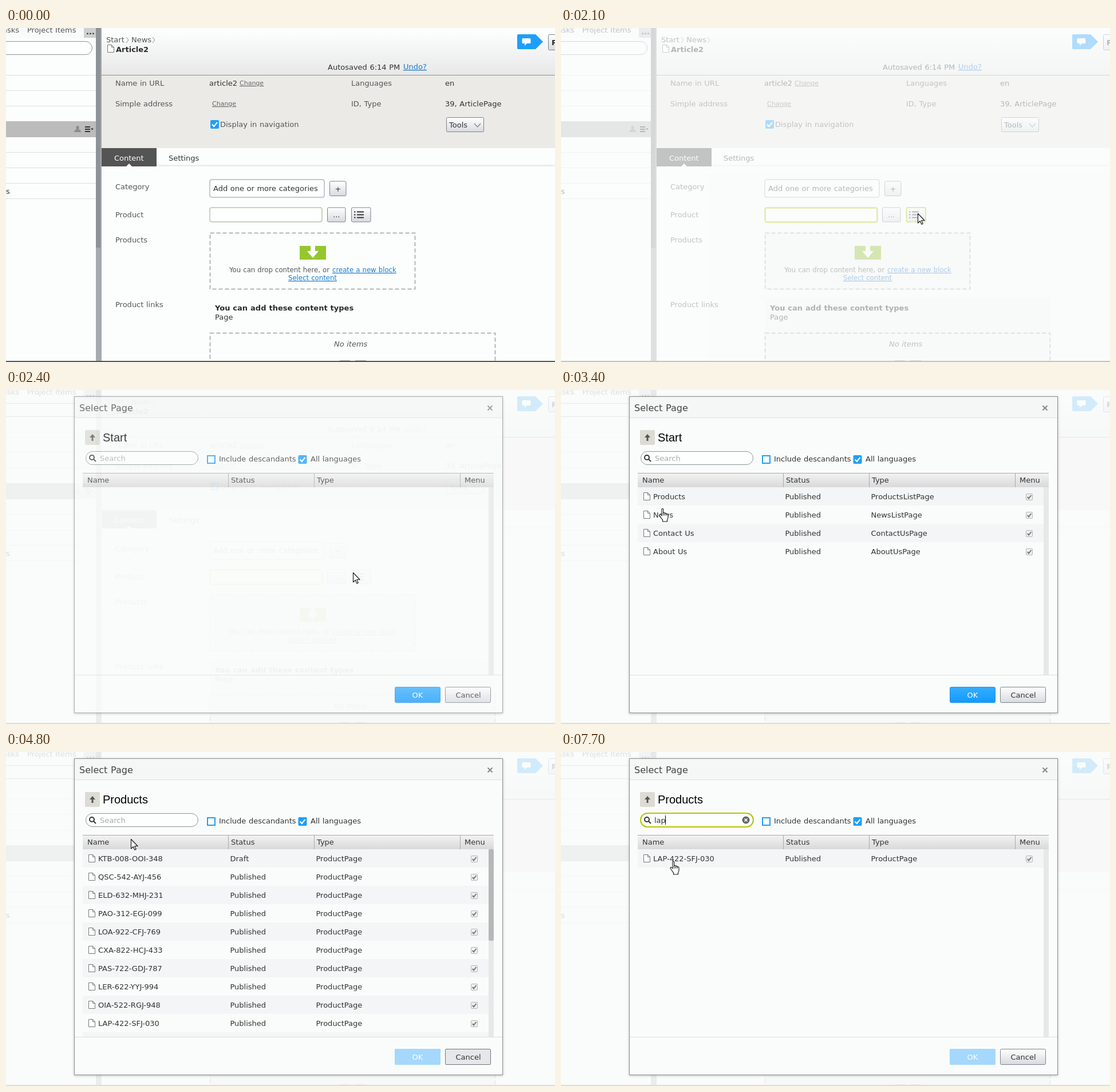
Recreate the animation shown at these times as an HTML page. Size 959 px wide and 584 px high, loop 8000 ms.

```html
<!DOCTYPE html>
<html lang="en">
<head>
<meta charset="utf-8">
<title>Select Page</title>
<style>
html, body { margin: 0; width: 100%; height: 100%; overflow: hidden; background: #fcfefe; }
svg { display: block; width: 100%; height: 100%; }
text { font: 13px "DejaVu Sans", sans-serif; word-spacing: .034em; fill: #555; white-space: pre; }
.dark text, text.dark { fill: #333; }
text.bold { font-weight: bold; fill: #2b2b2b; }
text.small { font-size: 11px; text-decoration: underline; fill: #666; }
text.drop { font-size: 11.7px; }
text.link { fill: #1a7bd0; text-decoration: underline; }
text.title { font-size: 16px; fill: #444; }
text.heading { font: 20px "Liberation Sans", Arial, sans-serif; fill: #000; }
.button { fill: url(#metal); stroke: #7d8389; }
.box { fill: #fdfefe; stroke: #8f9499; }
.dash { fill: none; stroke: #b4b4b8; stroke-width: 2; stroke-dasharray: 7 4; }
.line { fill: none; stroke: #dedede; }
.focus { fill: none; stroke: #b3c800; stroke-width: 2; }
.ink { fill: none; stroke: #333; stroke-width: 2; }
.pointer { fill: #fff; stroke: #111; stroke-width: 1.1; stroke-linejoin: round; }
</style>
</head>
<body>
<svg viewBox="0 0 959 584">
<defs>
  <linearGradient id="metal" x2="0" y2="1"><stop stop-color="#fff"/><stop offset="1" stop-color="#d8dae0"/></linearGradient>
  <linearGradient id="header" x2="0" y2="1"><stop offset=".1" stop-color="#fcfdfd"/><stop offset="1" stop-color="#e8e8e8"/></linearGradient>
  <linearGradient id="columns" x2="0" y2="1"><stop stop-color="#f3f3f3"/><stop offset="1" stop-color="#d9d9da"/></linearGradient>
  <linearGradient id="primary" x2="0" y2="1"><stop stop-color="#36adff"/><stop offset="1" stop-color="#129aff"/></linearGradient>
  <clipPath id="listArea"><path d="M134 170H843V498H134Z"/></clipPath>
  <filter id="shadow" x="-5%" y="-5%" width="110%" height="110%"><feDropShadow dx="0" dy="1" stdDeviation="2" flood-opacity=".25"/></filter>
  <path id="file" d="M.5 .5H7.5L11.5 4.5V13.5H.5ZM7.5 .5V4.5H11.5" fill="#fff" stroke="#777"/>
  <g id="checked"><rect width="15" height="15" rx="2" fill="#1c9ffb"/><path d="M3 7.5L6.3 11L12 4" fill="none" stroke="#fff" stroke-width="2.2"/></g>
  <g id="tick"><rect x=".5" y=".5" width="11" height="11" rx="1.5" fill="#f0f0f0" stroke="#b5b5b5"/><path d="M2.8 6L5 8.6L9.4 3" fill="none" stroke="#777" stroke-width="2"/></g>
</defs>

<rect width="959" height="584" fill="#fcfefe"/>

<!-- Side panel -->
<rect width="157" height="18" fill="#f9fafa"/>
<text x="-6" y="8">asks</text><text x="37" y="8">Project Items</text>
<rect x="136" width="21" height="17" fill="#cdcfd1"/><text class="bold" x="140" y="11">...</text>
<path class="box" d="M-5 23.5H139a11.5 11.5 0 0 1 0 23H-5"/>
<path class="line" d="M0 82.5H157M0 109.5H157M0 136.5H157M0 217.5H157M0 244.5H157M0 271.5H157M0 298.5H157"/>
<rect y="163" width="157" height="28" fill="#bcbcbc"/>
<path d="M119 182q0-4 4-4.500q-2-6 2-6.500q4 .5 2 6.500q4 .5 4 4.500Z" fill="#8c8c8c"/>
<path class="ink" d="M138 173H147M138 177H147M138 181H147"/><path d="M148 175.500h5l-2.500 3Z" fill="#333"/>
<text class="dark" x="0" y="290">s</text>
<rect x="157" width="10" height="584" fill="#a5aaae"/>
<rect x="157" width="8" height="384" fill="#8d9296"/>

<!-- Page header -->
<rect x="167" width="792" height="82" fill="url(#header)"/>
<rect x="167" y="82" width="792" height="128" fill="#ebeae6"/>
<path d="M167 82.500H959" stroke="#8f9191"/>
<text x="175" y="25">Start</text><text x="219" y="25">News</text>
<path d="M210 16l4 5l-4 5M256 16l4 5l-4 5" fill="none" stroke="#888"/>
<use href="#file" x="177" y="29"/><text class="bold" x="192" y="42">Article2</text>
<text class="dark" x="562" y="73">Autosaved 6:14 PM</text><text class="link" x="694" y="72">Undo?</text>
<path d="M895 11H925L938 24L925 37H895a2 2 0 0 1-2-2V13a2 2 0 0 1 2-2Z" fill="#1c9ffb"/>
<path d="M903 18h12q1.500 0 1.500 1.500v6q0 1.500-1.500 1.500h-5l-4 4v-4h-3q-1.500 0-1.500-1.500v-6q0-1.500 1.500-1.500Z" fill="#fff"/>
<rect class="button" x="947.500" y="11.500" width="40" height="27" rx="2"/><text class="bold" x="953" y="30">P</text>

<text x="191" y="101">Name in URL</text><text class="dark" x="355" y="101">article2</text><text class="small" x="408" y="100">Change</text>
<text x="603" y="101">Languages</text><text class="dark" x="767" y="101">en</text>
<text x="191" y="137">Simple address</text><text class="small" x="360" y="136">Change</text>
<text x="603" y="137">ID, Type</text><text class="dark" x="767" y="137">39, ArticlePage</text>
<use href="#checked" x="357" y="161"/><text x="374" y="173">Display in navigation</text>
<rect class="button" x="769.500" y="156.500" width="65" height="25" rx="2"/><text class="dark" x="774" y="174">Tools</text>
<path d="M818 167l5.500 6l5.500-6" fill="none" stroke="#888" stroke-width="1.500"/>

<!-- Form -->
<rect x="263" y="239" width="696" height="3" fill="#ededed"/>
<path d="M167 210H263V242H220L215 237L210 242H167Z" fill="#545454"/>
<text x="189" y="232" style="fill:#fff">Content</text><text class="dark" x="284" y="232">Settings</text>
<text x="191" y="282">Category</text><rect class="box" x="356" y="265" width="200" height="31" rx="3"/><text class="dark" x="362" y="285">Add one or more categories</text>
<rect class="button" x="565.500" y="268" width="28.500" height="25.500" rx="2"/><text class="dark" x="574.500" y="285.500">+</text>
<text x="191" y="331">Product</text><rect class="box" x="356" y="314" width="196" height="25" rx="3" style="stroke:#a0a085"/>
<rect class="focus" data-on="1000" x="356.500" y="314.500" width="196" height="25" rx="3" stroke-opacity=".6"/>
<rect class="focus" data-on="1100" x="356.500" y="314.500" width="196" height="25" rx="3"/>
<rect class="button" x="561.500" y="314" width="31.500" height="25" rx="2"/><text class="dark" x="571" y="331">...</text>
<rect class="button" x="603.500" y="314" width="33.500" height="25" rx="2"/>
<path class="ink" d="M613 321.500H625M613 326.500H625M613 331.500H625M608 321.500h2.500M608 326.500h2.500M608 331.500h2.500"/>
<rect class="focus" data-on="1900" x="603.500" y="314" width="33.500" height="25" rx="2"/>
<text x="191" y="375">Products</text>
<rect class="dash" x="356.500" y="358.500" width="358" height="98"/>
<rect x="513" y="381" width="46" height="24" fill="#95c62f"/><path d="M532 379h8v11h6l-10 12l-10-12h6Z" fill="#fff"/>
<text class="drop" x="390" y="427">You can drop content here, or</text><text class="drop link" x="570" y="427">create a new block</text>
<text class="drop link" x="493" y="441">Select content</text>
<text x="191" y="488">Product links</text><text class="bold" x="365" y="494">You can add these content types</text><text class="dark" x="365" y="510">Page</text>
<rect class="dash" x="356.500" y="533.500" width="498" height="80"/>
<text x="573" y="557" font-style="italic" style="font-style:italic">No items</text>
<path d="M583 581.500h18M610 581.500h19" stroke="#aaa"/>
<rect y="582" width="959" height="2" fill="#55585a"/>

<!-- Veil -->
<g id="veil">
  <rect width="959" height="584" fill="#fafcfc"/>
  <path d="M356 358H715V457H356ZM356 472H855V582H356Z" fill="#f7f7f7"/>
</g>

<!-- Dialog -->
<g id="dialog">
  <rect x="119.500" y="11.500" width="748" height="553" fill="#fafcfb" stroke="#8e8e8e" filter="url(#shadow)"/>
  <rect x="120" y="12" width="747" height="36" fill="#f5f6f6"/><path class="line" d="M120 48.500H867M120 498.500H867"/>
  <text class="title" x="128" y="37">Select Page</text>
  <path class="ink" d="M841.500 27.500l8 8m0-8l-8 8" style="stroke:#888"/>
  <rect x="138" y="70" width="26" height="26" rx="2" fill="#dcdbd4"/><path d="M151 77l5 6h-3.500v6h-3v-6H146Z" fill="#555"/>
  <text class="heading" data-off="4700" x="169" y="90">Start</text><text class="heading" data-on="4700" x="169" y="90">Products</text>

  <rect class="box" x="139.500" y="107.500" width="196" height="23" rx="11.500"/>
  <rect class="focus" data-on="6000" x="139" y="107" width="197" height="24" rx="12"/>
  <circle class="ink" cx="150" cy="118" r="4"/><path class="ink" d="M153 121l4 4"/>
  <text data-off="6500" x="164" y="124" style="fill:#aaa">Search</text>
  <text id="query" class="dark" x="163" y="124"></text>
  <path id="caret" data-on="6000" d="M.5 111V127" stroke="#000"/>
  <g data-on="6600"><circle cx="323" cy="119" r="6.500" fill="#666"/><path d="M320.500 116.500l5 5m0-5l-5 5" stroke="#fff" stroke-width="1.600"/></g>
  <rect x="352" y="115" width="13" height="13" fill="#fff" stroke="#1c9ffb" stroke-width="2"/><use href="#checked" x="510.500" y="114"/>
  <g class="dark"><text x="372" y="125">Include descandants</text><text x="532" y="125">All languages</text></g>

  <rect x="134" y="145" width="718" height="25" fill="url(#columns)"/>
  <path d="M134 145.500H852M388.500 146V170M538.500 146V170M793.500 146V170" stroke="#a9a9a9"/>
  <g class="dark"><text x="142" y="162">Name</text><text x="393" y="162">Status</text><text x="543" y="162">Type</text><text x="801" y="162">Menu</text></g>
  <rect x="843" y="170" width="9" height="328" fill="#e7e8e8"/>
  <rect data-on="4800" data-off="7200" x="843" y="170" width="9" height="160" rx="2" fill="#b6b7b7"/>
  <g id="lists" class="dark" clip-path="url(#listArea)"></g>

  <rect x="679.500" y="519.500" width="79" height="27" rx="2" fill="url(#primary)" stroke="#1a93ea"/>
  <rect data-on="4700" x="679" y="519" width="80" height="28" rx="2" fill="#a4d8fc"/>
  <text x="709.500" y="538" style="fill:#fff">OK</text>
  <rect class="button" x="767.500" y="519.500" width="79" height="27" rx="2"/>
  <rect data-on="4000" data-off="6500" x="767.500" y="519.500" width="79" height="27" rx="2" fill="#e6e7ea" stroke="#6f757b"/>
  <text class="dark" x="785.500" y="538">Cancel</text>
</g>

<!-- Pointers -->
<g id="hand" class="pointer">
  <path d="M5 2Q5 .7 6.300 .7T7.700 2V8.500Q8 7.600 9.200 7.800T10.500 9.300Q11 8.600 12 8.900T13.300 10.400Q14 9.800 15 10.300T16 12V16Q16 18.500 14.500 20.500V23.500H6.500V20.500Q4.500 18.500 3.500 16.500L1 13Q.5 11.700 1.600 11.200T3.700 12L5 13.500Z"/>
  <path d="M7.700 8V13M10.500 9V13M13.300 10V13" fill="none"/>
</g>
<path id="arrow" class="pointer" d="M.5 .5V17L4.300 13.400L6.800 19.200L9.200 18.200L6.700 12.500H12Z"/>
<path id="beam" d="M-3 -7.500H-1L0 -6.500L1 -7.500H3M0 -6.500V6.500M-3 7.500H-1L0 6.500L1 7.500H3" fill="none" stroke="#111" stroke-width="1.200"/>
</svg>

<script>
const LOOP = 8000;
const $ = id => document.getElementById(id);

const row = ([name, status, type], i) => {
  const y = 170 + 32 * i;
  return `${i % 2 ? '' : `<rect x="134" y="${y}" width="709" height="32" fill="#f4f5f6"/>`}
    ${name === 'Products' ? `<rect data-on="4000" x="134" y="${y}" width="709" height="32" fill="#c4d400"/>` : ''}
    <use href="#file" x="144" y="${y + 9}"/><text x="161" y="${y + 21}">${name}</text>
    <text x="391.500" y="${y + 21}">${status}</text><text x="541.500" y="${y + 21}">${type}</text>
    <use href="#tick" x="812" y="${y + 11}"/>`;
};
const list = (on, off, rows) => `<g data-on="${on}" data-off="${off}">${rows.map(row).join('')}</g>`;

const pages = ['Products', 'News', 'Contact Us', 'About Us'].map(name =>
  [name, 'Published', name.replace(' ', '') + (/s$/.test(name) && !/ /.test(name) ? 'ListPage' : 'Page')]);
const products = ['KTB-008-OOI-348', 'QSC-542-AYJ-456', 'ELD-632-MHJ-231', 'PAO-312-EGJ-099', 'LOA-922-CFJ-769',
  'CXA-822-HCJ-433', 'PAS-722-GDJ-787', 'LER-622-YYJ-994', 'OIA-522-RGJ-948', 'LAP-422-SFJ-030', '']
  .map((name, i) => [name, i ? 'Published' : 'Draft', 'ProductPage']);

$('lists').innerHTML = list(2500, 4800, pages) + list(4800, 7200, products) +
  list(7200, LOOP, products.filter(([name]) => name.startsWith('LAP')));

// Each track holds its value from the given time until the next entry.
const veil = [[0, 0], [1900, .22], [2000, .45], [2100, .66], [2200, .82]];
const dialog = [[0, 0], [2300, .35], [2400, .75], [2500, 1]];
const query = [[0, ''], [6500, 'l'], [6900, 'la'], [7000, 'lap']];
const caretX = [163, 167, 174.5, 182];
const pointer = [
  [0, 'none'], [100, 'arrow', 210, 352], [200, 'arrow', 330, 340], [300, 'arrow', 410, 322], [400, 'beam', 436, 329],
  [1300, 'beam', 492, 331], [1400, 'arrow', 580, 325], [1500, 'hand', 617, 323.5],
  [1700, 'arrow', 623, 324], [2400, 'arrow', 606, 319], [2500, 'arrow', 582, 312],
  [3000, 'arrow', 480, 288], [3100, 'arrow', 335, 246], [3200, 'hand', 210, 210], [3300, 'hand', 163, 202], [3400, 'hand', 171, 206.5],
  [3700, 'hand', 175, 196], [3800, 'hand', 177, 189.5],
  [4700, 'hand', 196, 176], [4800, 'arrow', 218, 152], [4900, 'arrow', 229, 139],
  [5500, 'arrow', 231, 135], [5600, 'beam', 238, 127], [5700, 'beam', 240, 121], [5800, 'beam', 241, 119],
  [7700, 'hand', 190, 190.5]
];
const at = (track, t) => track.findLast(([start]) => start <= t);

const timed = [...document.querySelectorAll('[data-on], [data-off]')].map(el =>
  ({ el, on: +(el.dataset.on || 0), off: +(el.dataset.off || LOOP) }));
const begin = performance.now();

function draw() {
  const t = (performance.now() - begin) % LOOP;
  for (const { el, on, off } of timed) el.style.display = t >= on && t < off ? '' : 'none';
  $('veil').style.opacity = at(veil, t)[1];
  $('dialog').style.opacity = at(dialog, t)[1];
  const typed = at(query, t)[1];
  $('query').textContent = typed;
  $('caret').setAttribute('transform', `translate(${caretX[typed.length]})`);
  const [, kind, x, y] = at(pointer, t);
  for (const id of ['hand', 'arrow', 'beam']) {
    $(id).style.display = id === kind ? '' : 'none';
    if (id === kind) $(id).setAttribute('transform', `translate(${x} ${y})`);
  }
  requestAnimationFrame(draw);
}
draw();
</script>
</body>
</html>
```
